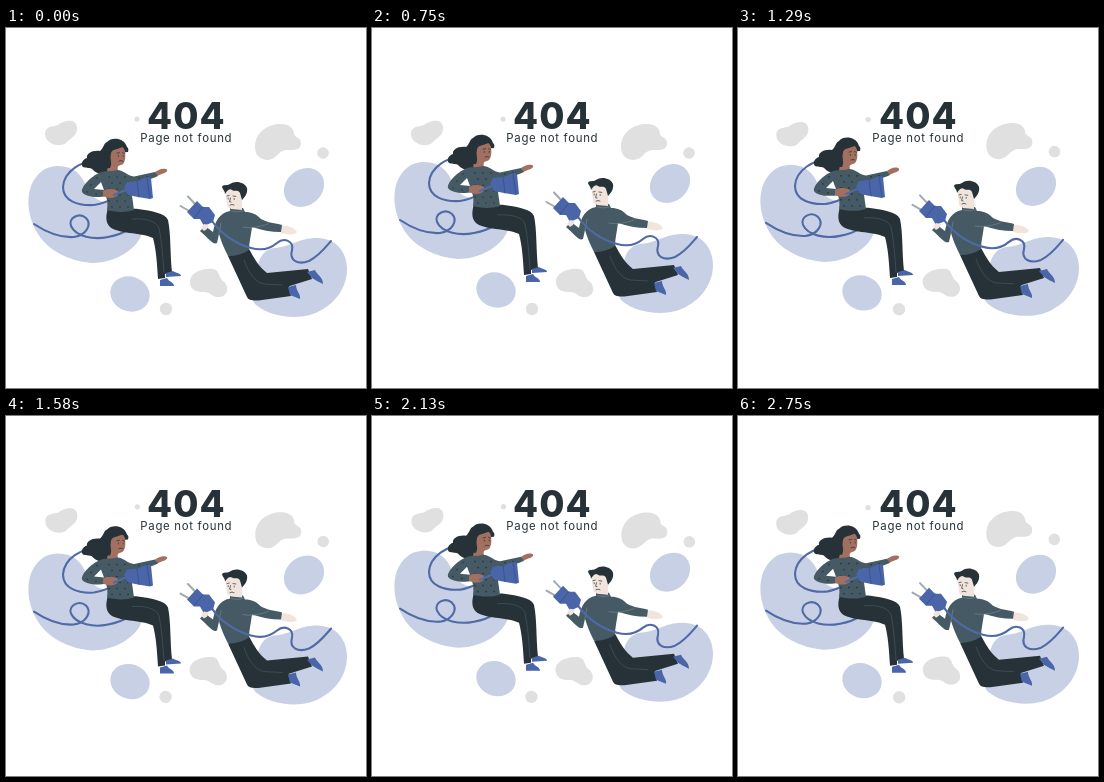
Write an HTML page that moves like this. It is 360 by 360 pixels and loops after 2790 ms.

```html
<!DOCTYPE html>
<html lang="en">
<head>
<meta charset="utf-8">
<title>404</title>
<style>
  html, body { margin: 0; width: 100%; height: 100%; overflow: hidden; background: #fff; }
  svg { display: block; width: 100%; height: 100%; }
  text { font-family: Inter, "Open Sans", sans-serif; text-anchor: middle; fill: #263238; }
  .grey { fill: #e0e0e0; }
  .pale { fill: #c8d0e5; }
  .blue { fill: #4a66a8; }
  .dark { fill: #263238; }
  .knit { fill: #455a64; }
  .tan { fill: #a27060; }
  .fair { fill: #f1e4dc; }
  .cable { fill: none; stroke: #4f6aa5; stroke-width: 2.1; stroke-linecap: round; }
  .line { fill: none; stroke: #263238; stroke-width: .7; stroke-linecap: round; }
  .seam { fill: none; stroke: #75858d; stroke-width: .7; stroke-linecap: round; }
  .fold { stroke: #46565e; }
  .edge { stroke: #344d87; }
</style>
</head>
<body>
<svg viewBox="0 0 360 360">
  <g id="wind" class="grey">
    <path d="M39 106C39 98 46 99 52 97C58 92 70 90 71 99C72 108 64 110 60 115C54 120 39 116 39 106Z"/>
    <path d="M249 119C249 104 262 96 275 96C284 96 288 101 288 106C289 110 295 109 295 115C295 123 287 122 280 122C272 123 271 131 262 132C254 132 249 127 249 119Z"/>
    <path d="M184 255C183 245 196 240 207 241C214 242 212 249 217 253C224 258 222 268 214 269C206 270 205 264 198 264C190 264 185 262 184 255Z"/>
    <circle cx="131" cy="91" r="2.6"/>
    <circle cx="317" cy="125" r="5.8"/>
    <circle cx="160" cy="281" r="6.2"/>
  </g>

  <text x="180.3" y="101" font-size="36.5" font-weight="800" letter-spacing="1">404</text>
  <text x="180.3" y="113.8" font-size="11.4" letter-spacing=".7">Page not found</text>

  <g id="float">
    <g class="pale">
      <path d="M50 138C66 137 76 146 80 158C86 176 104 174 120 180C134 185 140 196 135 208C128 224 106 235 86 235C62 233 42 222 32 206C22 190 20 172 25 158C30 146 38 139 50 138Z"/>
      <path d="M311 210C330 210 341 224 341 241C341 262 326 280 304 287C284 292 262 287 250 277C243 270 247 262 252 254C249 234 256 222 268 220C285 219 292 210 311 210Z"/>
      <ellipse cx="298" cy="159.5" rx="21.5" ry="18" transform="rotate(-40 298 159.5)"/>
      <ellipse cx="124" cy="266" rx="20" ry="17.3" transform="rotate(20 124 266)"/>
    </g>

    <g id="woman">
      <path class="cable" d="M28 196C40 204 54 210 68 209C81 207 86 196 80 190C73 184 62 190 65 198C70 209 88 212 102 209C118 206 130 199 136 187"/>
      <path class="cable" d="M92 133C76 132 58 143 57 159C57 173 72 178 88 177C102 175 110 169 122 163"/>
      <path class="dark" d="M121 119C118 109 105 109 101 114C97 116 98 120 94 123C86 122 80 126 81 130C77 131 74 136 77 139C82 141 85 139 87 142C92 147 100 147 105 143C111 139 107 131 110 125L122 124C123 121 122 120 121 119Z"/>
      <path class="dark" d="M102 180C112 183 125 180 132 181C146 183 159 185 162 192C165 206 164 226 166 244L159 246L159 250L152 251C151 234 150 221 147 210C134 204 112 206 104 199C99 194 100 187 102 180Z"/>
      <path class="line fold" d="M126 191C140 190 150 193 153 200C156 214 157 232 158 245"/>
      <path class="blue" d="M160 245L167 243C170 245 175 245 175 248L160 249ZM154 252L161 250C163 254 168 254 168 258L154 258Z"/>
      <path class="tan" d="M106 119C111 115 118 118 119 123C120 130 119 136 115 137C112 138 111 138 112 143L105 147L101 143L104 130Z"/>
      <path class="dark" d="M105 125C107 120 112 122 118 118C113 113 104 115 103 121C101 127 103 134 99 140L104 140C107 135 103 129 105 125Z"/>
      <path class="line" d="M111 125.2L113.5 124.7M116.5 124.7L118.4 125.4M112.4 127.4V128.4M117.2 127.4V128.4M113 133Q115 132 116.8 133"/>
      <path class="tan" d="M149 144C153 142 155 140 160 141C163 142 160 145 157 145.5L151 148Z"/>
      <path class="knit" fill-rule="evenodd" d="M93 145C99 142 105 144 111 142C118 142 121 148 128 148.5L149 144L152 148C143 152 133 154 125 154C125 164 127 174 128 182C119 185 108 184 101 182C102 176 101 172 100 168C92 170 79 169 76 164C75 158 86 148 93 145ZM95 154L88 161L98 162Z"/>
      <g id="dots" class="dark"></g>
      <path class="tan" d="M97 163C102 160 108 161 112 163L111 168C106 171 101 170 97 168Z"/>
      <path class="cable" d="M108 167L122 161"/>
      <path class="blue" d="M118 160L121 154L132 153L141 149L145 150L147 170L144 171L132 169L122 167Z"/>
      <path class="line edge" d="M131 153L133 169M141 150L144 170"/>
    </g>

    <g id="man">
      <path class="dark" d="M230 226L243 221C248 230 253 239 261 245L302 241L306 251L271 262L252 261Z"/>
      <path class="dark" d="M222 228L241 269C243 273 248 273 256 272L285 268L283 258L259 256C252 246 246 236 243 222Z"/>
      <path class="line fold" d="M238 232C243 246 249 254 258 256L276 257"/>
      <path class="blue" d="M301 244L309 242C311 247 317 249 317 256L311 253L306 250ZM282 259L290 257C290 263 295 266 294 271L284 267Z"/>
      <path class="fair" d="M274 198C280 197 288 199 291 204C288 208 280 206 275 205Z"/>
      <path class="knit" d="M224 180L237 180L239 184C246 184 250 186 255 191C262 195 269 195 276 197L275 204C265 204 255 202 246 199C245 207 243 215 243 222C237 226 230 228 222 228C218 220 215 213 213 206L211 215C207 217 203 211 194 203L199 198L207 204C209 194 213 185 224 183Z"/>
      <path class="seam" d="M237 199C246 201 256 198 262 196M215 195L213 206M225 183Q231 185 237 183"/>
      <path class="fair" d="M219 161L235 161C237 168 236 175 236 182L225 181C225 180 222 181 221 177Z"/>
      <path class="dark" d="M216 159C217 156 221 158 224 156C229 152 239 154 241 160C242 165 239 169 236 172L234 165C232 161 229 164 226 162C223 160 221 163 219 166C219 163 217 162 216 159Z"/>
      <path class="line" d="M221 168L223.2 167.5M227 168L229.8 168.4M222.2 170V171M228.2 170.5V171.5M224.5 170L223.6 173.6L225 174M224 177Q226 175.8 228 177"/>
      <path class="cable" d="M206 193C215 206 230 216 245 220C256 223 264 221 271 215C278 209 288 213 286 222C283 233 292 237 303 233C313 228 319 220 325 213"/>
      <path d="M174.5 178L185 184M182 168.5L190 177" stroke="#a2a9b2" stroke-width="2" stroke-linecap="round"/>
      <path class="blue" d="M181 184L191 173L197 179L203 179L209 187L207 194L198 198L194 191L188 191Z"/>
      <path class="line edge" d="M188 190L197 179"/>
      <path class="fair" d="M195 200L198 196L203 197L201 201L198 203Z"/>
    </g>
  </g>
</svg>
<script>
  const LOOP = 2790, PERIOD = 1500, FPS = 24;
  const LIFT = 4, SWAY = 1;
  const el = id => document.getElementById(id);
  const wind = el("wind"), float = el("float");

  const spots = [];
  for (let row = 0; row < 6; row++) {
    for (let col = 0; col < 3; col++) {
      spots.push([103 + col * 8 + row % 2 * 3, 149 + row * 6]);
    }
  }
  spots.push([85, 157], [81, 164], [91, 150], [90, 166], [133, 150], [141, 149]);
  el("dots").innerHTML = spots
    .map(([x, y]) => `<circle cx="${x}" cy="${y}" r=".8"/>`).join("");

  // Triangle wave from 0 up to 1 at half a period
  const rise = p => 1 - Math.abs(1 - 2 * p);
  // Linear swing: 0, 1, 0, -1, 0
  const swing = p => 2 * rise((p + 0.25) % 1) - 1;

  function draw(ms) {
    const step = Math.floor(ms % LOOP * FPS / 1000 + 0.1);
    const p = step / FPS * 1000 % PERIOD / PERIOD;
    wind.setAttribute("transform", `rotate(${SWAY * swing(p)} 180 180)`);
    float.setAttribute("transform", `translate(0 ${-LIFT * rise(p)})`);
  }

  const start = performance.now();
  function tick() {
    draw(performance.now() - start);
    requestAnimationFrame(tick);
  }
  draw(0);
  requestAnimationFrame(tick);
</script>
</body>
</html>
```
